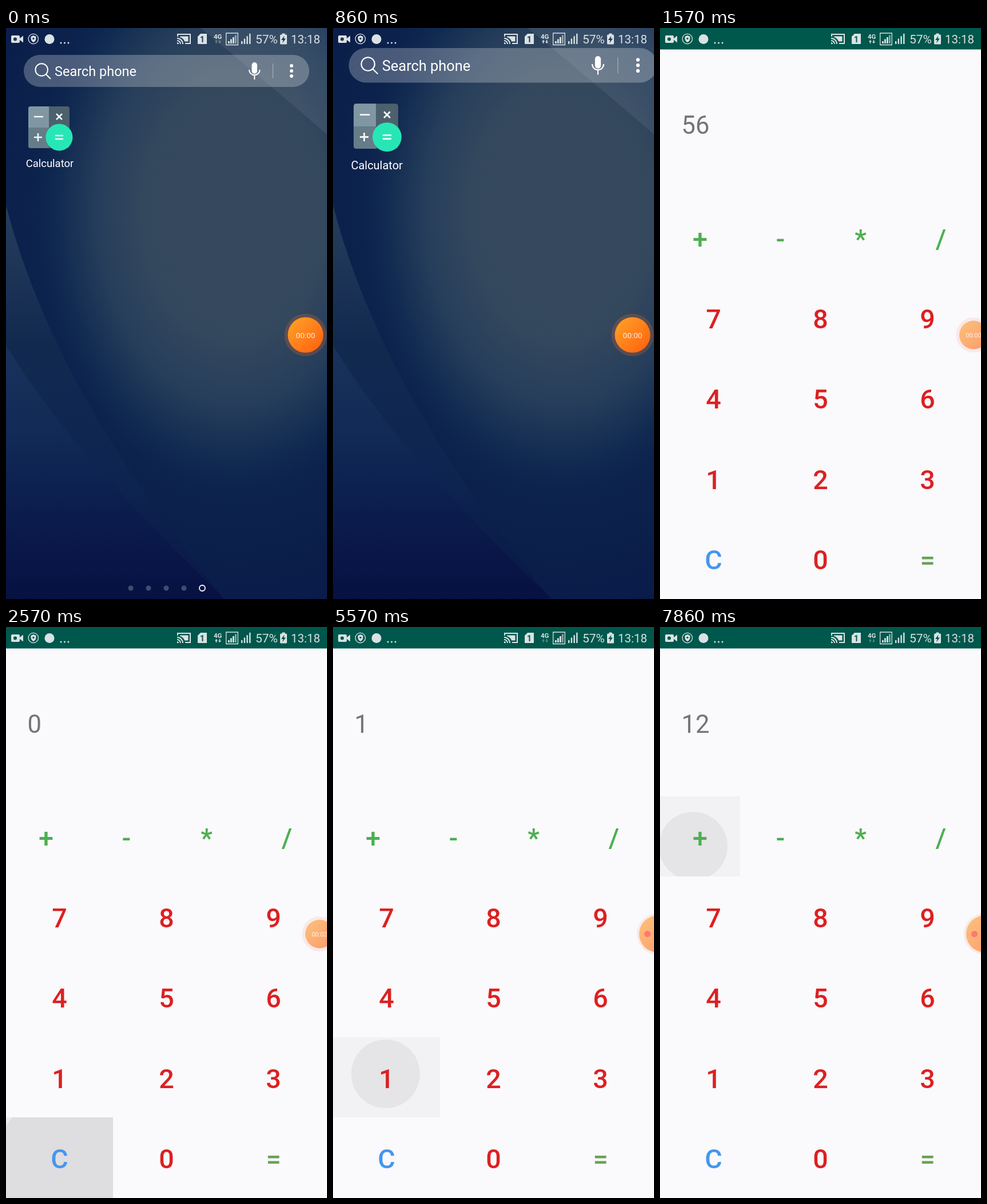
Recreate the animation shown at these times as an HTML page with a canvas. Size 561 by 998 pixels, loop 8 s.

```html
<!DOCTYPE html>
<html lang="en">
<head>
<meta charset="utf-8">
<title>Phone calculator</title>
<style>
html, body { margin: 0; width: 100%; height: 100%; overflow: hidden; background: #faf9fc; }
canvas { display: block; }
</style>
</head>
<body>
<canvas id="stage" width="561" height="998"></canvas>
<script>
const ctx = document.getElementById('stage').getContext('2d');
const W = 561, H = 998, FPS = 7, STEPS = 56, TAU = Math.PI * 2;
const ROW_TOP = 296, ROW_H = 140.4;
const clamp = v => Math.max(0, Math.min(1, v));

function rect(x, y, w, h, fill, r = 0) {
  ctx.beginPath();
  ctx.roundRect(x, y, w, h, r);
  ctx.fillStyle = fill;
  ctx.fill();
}

function disc(x, y, r, fill) {
  ctx.beginPath();
  ctx.arc(x, y, r, 0, TAU);
  ctx.fillStyle = fill;
  ctx.fill();
}

function stroke(path, color, width = 2) {
  ctx.strokeStyle = color;
  ctx.lineWidth = width;
  ctx.stroke(new Path2D(path));
}

function shape(path, fill) {
  ctx.fillStyle = fill;
  ctx.fill(new Path2D(path));
}

function text(str, x, y, size, fill, align = 'left', weight = 400) {
  ctx.font = `${weight} ${size}px Roboto, sans-serif`;
  ctx.textAlign = align;
  ctx.fillStyle = fill;
  ctx.fillText(str, x, y);
}

function withStops(gradient, stops) {
  stops.forEach(([at, color]) => gradient.addColorStop(at, color));
  return gradient;
}

const vertical = (y0, y1, ...stops) =>
  withStops(ctx.createLinearGradient(0, y0, 0, y1), stops);

function wallpaper() {
  ctx.save();
  ctx.translate(400, 320);
  ctx.scale(340, 480);
  ctx.fillStyle = withStops(ctx.createRadialGradient(0, 0, 0, 0, 0, 1.5), [
    [0, '#35485e'], [.32, '#33475d'], [.47, '#263e5b'], [.6, '#122b51'],
    [.68, '#0c234d'], [1, '#0a1b49']]);
  ctx.fillRect(-2, -1, 4, 3);
  ctx.restore();
  shape('M340 0Q450 90 561 186V0Z', 'rgba(150,165,180,.13)');
  shape('M0 310C60 540 190 760 375 990L375 998H0Z',
    vertical(310, 960, [0, '#263e5d'], [.38, '#12294f'], [.7, '#0e2552'], [1, '#0a1a48']));
  shape('M0 555C90 700 200 820 375 990L380 998H0Z',
    vertical(555, 998, [0, '#19335c'], [.35, '#112a56'], [.7, '#0a1b4c'], [1, '#071142']));
}

function calculatorIcon() {
  rect(39, 137, 72, 73, '#4c606d', 4);
  rect(39, 137, 36, 37, '#8097a3', [4, 0, 0, 0]);
  rect(39, 174, 36, 36, '#667c88', [0, 0, 0, 4]);
  disc(93, 191, 23.5, '#27e6b6');
  stroke('M49 155H65M88 150L98 160M98 150L88 160M49 191H63M56 184V198M86 188H100M86 194H100',
    '#f4f6f7', 2.6);
}

function home(zoom) {
  wallpaper();
  ctx.save();
  ctx.translate(75, 197);
  ctx.scale(zoom, zoom);
  ctx.translate(-75, -197);

  rect(31, 47, 499, 56, 'rgba(255,255,255,.25)', 28);
  stroke('M73 73A10.8 10.8 0 1 1 51.4 73A10.8 10.8 0 1 1 73 73M70 81L78 89', '#fff');
  text('Search phone', 85, 84, 23.5, '#fff');
  rect(429.5, 60, 9.5, 20, '#fff', 4.8);
  stroke('M425 73A9.3 9.3 0 0 0 443.6 73M434.3 82V90', '#fff');
  stroke('M466.5 62V88', 'rgba(255,255,255,.35)', 1.3);
  for (const y of [66, 75, 84]) disc(499, y, 2.9, '#fff');

  calculatorIcon();
  text('Calculator', 76.5, 243, 18.5, '#fff', 'center');

  for (let i = 0; i < 4; i++) disc(218 + i * 31, 979, 4.5, 'rgba(255,255,255,.24)');
  stroke('M348 979A5 5 0 1 1 338 979A5 5 0 1 1 348 979', '#fff', 1.8);
  ctx.restore();
}

function statusBar(back, dataActive) {
  const ink = '#d9e2e4';
  rect(9, 13, 15, 13, ink, 2);
  shape('M23 19L30 13.5V25.5L23 20Z', ink);
  disc(16, 19.5, 3, back);
  stroke('M56.5 19A8.7 8.7 0 1 1 39.1 19A8.7 8.7 0 1 1 56.5 19', ink, 1.3);
  shape('M48 13L52.5 15V19Q52 23 48 25Q44 23 43.5 19V15Z', ink);
  disc(48, 18.5, 1.7, back);
  disc(76, 19.5, 8.5, ink);
  for (const x of [96, 102.5, 109]) disc(x, 26, 1.5, ink);

  stroke('M300 15V11H322V27H313', ink, 2);
  stroke('M299 18A10 10 0 0 1 309 28M299 22A6 6 0 0 1 305 28', ink, 2);
  shape('M299 25A3 3 0 0 1 302 28H299ZM304 14.5H318.5V23.5H312Q310 17.5 304 16Z', ink);
  shape('M340 10H351V28H335V15Z', ink);
  text('1', 343, 24.5, 14, back, 'center', 700);

  text('4G', 363, 19, 11.5, ink, 'left', 700);
  ctx.globalAlpha = dataActive ? 1 : .4;
  shape('M365 24L367.5 21L370 24H368.3V27H366.7V24ZM371 24H372.7V21H374.3V24H376L373.5 27Z', ink);
  ctx.globalAlpha = 1;

  stroke('M384.7 9H405.3V29.5H384.7Z', ink, 1.3);
  for (let i = 0; i < 4; i++) {
    rect(388 + i * 4, 23 - i * 3.5, 2.8, 4 + i * 3.5, i < 3 ? ink : '#91a9ae');
    rect(411 + i * 4.7, 23 - i * 4.4, 2.4, 5 + i * 4.4, ink);
  }
  text('57%', 436, 27, 21, ink);
  rect(482.5, 9.5, 5, 3, ink);
  rect(479, 11.5, 12, 17, ink, 1.5);
  shape('M486.5 13.5L481 21H484.5L483 26.5L489 18.5H485.5Z', back);
  text('13:18', 498, 27, 20.5, ink);
}

// Each tap: first step, steps held, key box, touch point.
const taps = [
  { at: 16, hold: 2, box: [0, 857, 187, 141], x: 100, y: 935 },
  { at: 39, hold: 0, box: [0, 717, 187, 140], x: 92, y: 781 },
  { at: 46, hold: 0, box: [187, 717, 187, 140.5], x: 260, y: 788 },
  { at: 55, hold: 0, box: [0, 296, 140.3, 140], x: 58, y: 383 }
];

function ripple(tap, step) {
  const age = step - tap.at;
  const fade = clamp((5 + tap.hold - age) / 5);
  if (age < 0 || !fade) return;
  ctx.save();
  ctx.beginPath();
  ctx.rect(...tap.box);
  ctx.clip();
  rect(...tap.box, `rgba(0,0,0,${(.032 + .014 * Math.min(age, tap.hold)) * fade})`);
  disc(tap.x, tap.y, 60 + 29 * age, `rgba(0,0,0,${.054 * fade})`);
  ctx.restore();
}

function keyRow(row, keys, colors) {
  const cell = W / keys.length;
  [...keys].forEach((key, i) =>
    text(key, cell * (i + .5), ROW_TOP + ROW_H * (row + .5) + 18.4, 46.7,
      colors[i % colors.length], 'center', 500));
}

function calculator(step) {
  const entering = step === 7;
  if (entering) {
    rect(0, 0, W, H, vertical(0, H, [0, '#2a5aa8'], [.18, '#3f78c4'], [.2, '#1f55a8'],
      [.7, '#17479a'], [1, '#1b4796']));
    ctx.translate(1, 1.5);
    ctx.scale(.986, .986);
  }
  rect(0, 0, W, H, entering ? '#f7f7f7' : '#faf9fc');
  rect(0, 0, W, 37.5, '#00574b');

  taps.forEach(tap => ripple(tap, step));
  const shown = step < 16 ? '56' : step < 39 ? '0' : step < 46 ? '1' : '12';
  text(shown, 37.5, 184.5, 43.6, '#757575');

  const red = '#dc2021';
  keyRow(0, '+-*/', ['#4caf50']);
  keyRow(1, '789', [red]);
  keyRow(2, '456', [red]);
  keyRow(3, '123', [red]);
  keyRow(4, 'C0=', ['#4596ee', red, '#69a155']);
}

function bubble(step) {
  const docked = step >= 35;
  const slide = clamp((step - 7) / 3);
  const x = docked ? 567 : step < 7 ? 523.5 : 525 + 23 * slide;
  const r = docked ? 32 : 31 - 6 * slide;
  const y = 536.5;

  ctx.save();
  if (step === 7) {
    ctx.beginPath();
    ctx.rect(0, 0, 554, H);
    ctx.clip();
  }
  ctx.globalAlpha = step < 7 ? 1 : .57;
  disc(x, y, r + (docked ? 4 : 3.5 + r / 12), step < 7 ? 'rgba(255,110,40,.22)' : 'rgba(240,130,100,.24)');
  disc(x, y, r, withStops(ctx.createLinearGradient(x - r * .7, y - r * .7, x + r * .7, y + r * .7),
    [[0, '#ff9a25'], [1, '#ff6812']]));
  ctx.globalAlpha = 1;
  if (docked) {
    disc(549.5, y, 5.6, step < 39 ? 'rgba(255,120,114,.5)' : '#ff7872');
  } else {
    const seconds = [12, 17, 23, 31].filter(s => step >= s).length;
    text('00:0' + seconds, x, y + r * .17, 13.7 * r / 31, 'rgba(255,255,255,.85)', 'center');
  }
  ctx.restore();
}

function draw(step) {
  ctx.setTransform(1, 0, 0, 1, 0, 0);
  const atHome = step < 7;
  if (atHome) home(1 + .08 * clamp((step - 3) / 3) ** 2);
  else calculator(step);
  ctx.setTransform(1, 0, 0, 1, 0, 0);
  statusBar(atHome ? '#1d3655' : '#00574b', step >= 1 && step < 23);
  bubble(step);
}

const start = performance.now();
function tick() {
  // A few ms of slack absorbs rounding at step boundaries.
  draw(Math.floor((performance.now() - start + 3) * FPS / 1000) % STEPS);
  requestAnimationFrame(tick);
}
tick();
</script>
</body>
</html>
```
